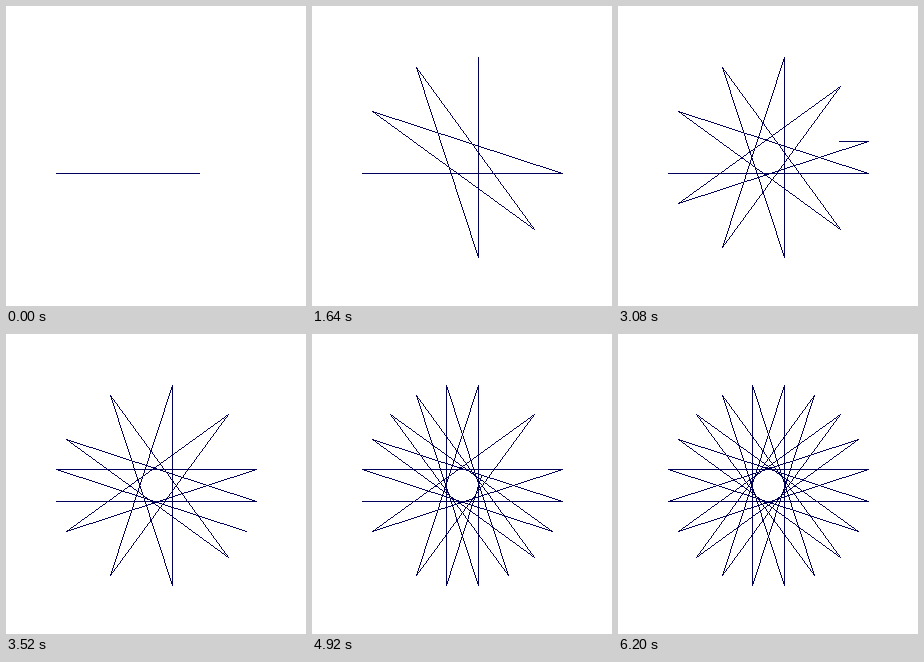
These frames come from a looping animation (300x300 px, 7.32 s). An HTML page with a canvas:

```html
<!DOCTYPE html>
<html lang="en">
<head>
<meta charset="utf-8">
<title>Twenty-point star</title>
<style>
  html, body { margin: 0; width: 100%; height: 100%; overflow: hidden; background: #fff; }
  canvas { display: block; }
</style>
</head>
<body>
<canvas id="stage" width="300" height="300"></canvas>
<script>
const ctx = document.getElementById('stage').getContext('2d');
const LOOP = 7320, TICK = 40;
const SIDE = 200, TURN = 162, HOPS = 7, HOP_MS = 20;
// When the pen sets off along each side; it turns in the time between.
const starts = [-100, 200, 500, 800, 1160, 1500, 1820, 2140, 2460, 2700,
  3060, 3380, 3700, 4020, 4300, 4580, 4840, 5140, 5440, 5720];

// Hard-edged line, one pixel per step of the longer axis.
function line(x0, y0, x1, y1) {
  [x0, y0, x1, y1] = [x0, y0, x1, y1].map(Math.round);
  const n = Math.max(Math.abs(x1 - x0), Math.abs(y1 - y0));
  for (let i = 0; i <= n; i++) {
    const k = n ? i / n : 0;
    ctx.fillRect(Math.round(x0 + (x1 - x0) * k), Math.round(y0 + (y1 - y0) * k), 1, 1);
  }
}

function draw(time) {
  const t = Math.floor(time % LOOP / TICK) * TICK;
  ctx.fillStyle = '#fff';
  ctx.fillRect(0, 0, 300, 300);
  ctx.fillStyle = '#000058';
  let x = 50, y = 167;
  starts.forEach((start, i) => {
    const hops = Math.min(HOPS, Math.floor((t - start) / HOP_MS));
    if (hops <= 0) return;
    const angle = i * TURN * Math.PI / 180;
    const length = SIDE * hops / HOPS;
    const nx = x + length * Math.cos(angle);
    const ny = y - length * Math.sin(angle);
    line(x, y, nx, ny);
    [x, y] = [nx, ny];
  });
}

const begin = performance.now();
function frame() {
  draw(performance.now() - begin);
  requestAnimationFrame(frame);
}
frame();
</script>
</body>
</html>
```
